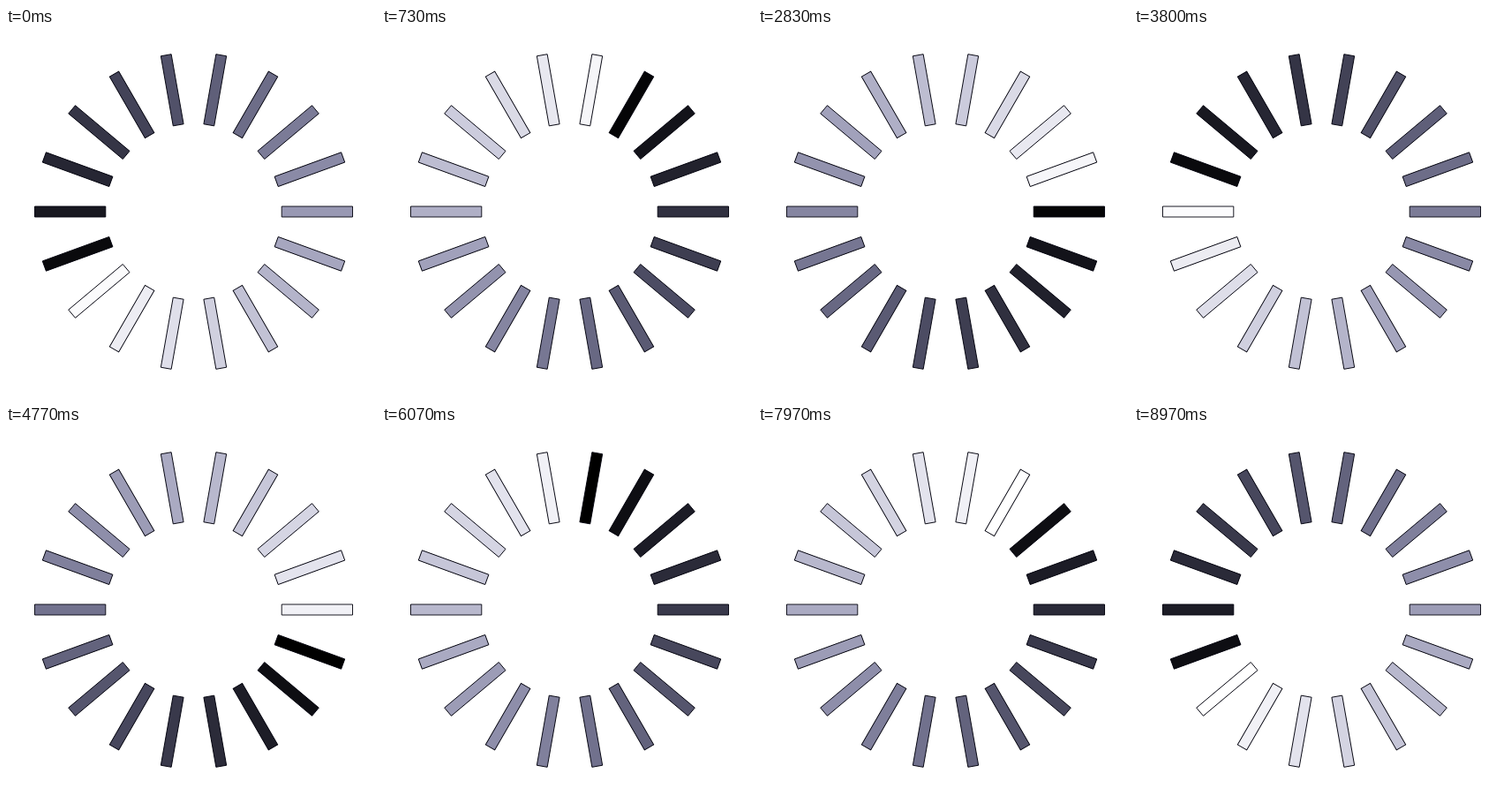
An HTML page with a canvas that plays this animation: 419x419 px, repeating every 9010 ms.

```html
<!DOCTYPE html>
<html lang="en">
<head>
<meta charset="utf-8">
<title>Spinner</title>
<style>
html, body { margin: 0; height: 100%; overflow: hidden; background: #fff; }
canvas { display: block; }
</style>
</head>
<body>
<canvas id="stage" width="419" height="419"></canvas>
<script>
const ctx = document.getElementById('stage').getContext('2d');
const LOOP = 9010, FRAMES = 270, BARS = 18;
const START = 145.8, STEP = 6.6704; // wave front in degrees, and its advance per frame

// Linear grey with a bluish cast in the midtones
function shade(light) {
  const grey = Math.round(255 * light);
  const blue = Math.round(grey + 28 * Math.sin(Math.PI * light));
  return `rgb(${grey},${grey},${blue})`;
}

function drawBar(angle, fill) {
  ctx.save();
  ctx.translate(212.5, 208);
  ctx.rotate(angle * Math.PI / 180);
  ctx.beginPath();
  ctx.rect(99.7, -6, 80.3, 12);
  ctx.fillStyle = fill;
  ctx.fill();
  ctx.lineWidth = 0.9;
  ctx.strokeStyle = '#00000c';
  ctx.stroke();
  ctx.restore();
}

function draw(now) {
  const frame = Math.min(Math.floor((now % LOOP + 4) * 0.03), FRAMES - 1);
  const front = START + frame * STEP;
  ctx.clearRect(0, 0, 419, 419);
  for (let i = 0; i < BARS; i++) {
    const angle = i * 360 / BARS;
    // Each bar turns white as the front passes, then darkens for a full turn
    const age = (front - angle + 360) % 360 / 360;
    drawBar(angle, shade(1 - age));
  }
  requestAnimationFrame(draw);
}
requestAnimationFrame(draw);
</script>
</body>
</html>
```
